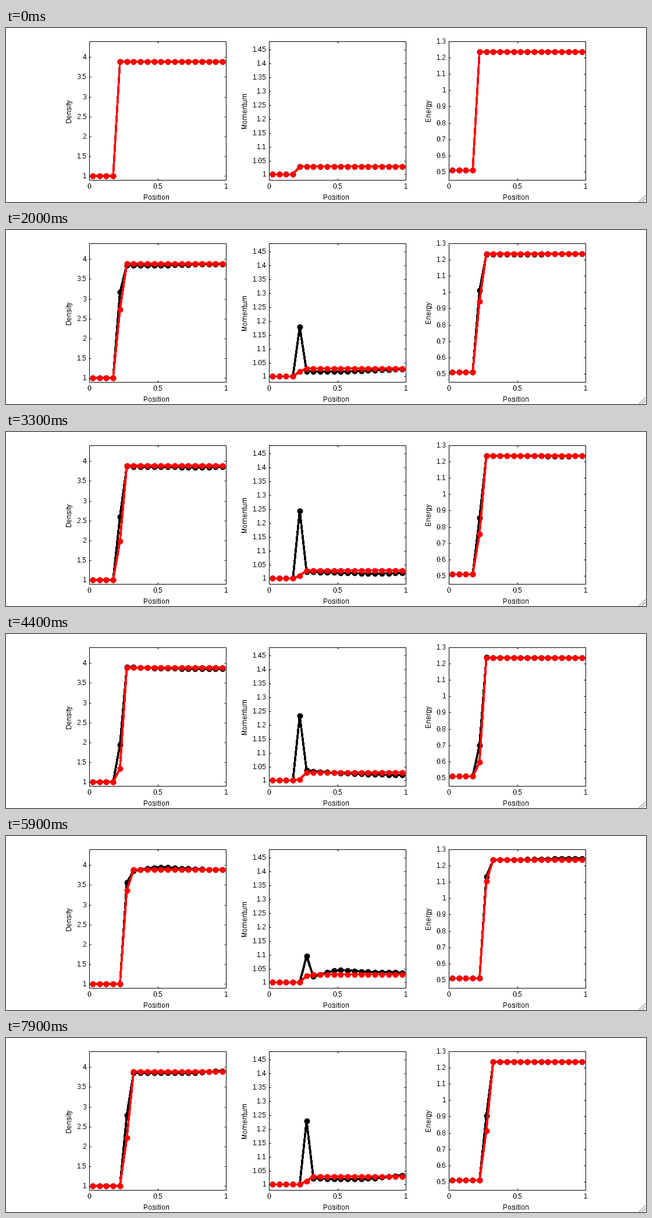
A matplotlib script that plays this animation: 1100 by 300 pixels, repeating every 8 s.

```python
import numpy as np
import matplotlib.pyplot as plt
from matplotlib.animation import FuncAnimation
from matplotlib.lines import Line2D

W, H, DPI = 1100, 300, 100
PX = 72 / DPI
FRAMES, INTERVAL = 80, 100

plt.rcParams.update({
    "font.family": "Liberation Sans",
    "font.size": 12 * PX,
    "text.antialiased": False,
    "text.hinting": "native",
    "text.hinting_factor": 1,
})

# Slowly moving Mach 10 shock in a monatomic gas
GAMMA, MACH, SPEED = 5 / 3, 10.0, 0.01
CELLS, START = 20, 0.2
DX = 1 / CELLS
STEP, SUBSTEPS = 0.1, 4
X = (np.arange(CELLS) + 0.5) * DX


def conserved(rho, u, p):
    return np.array([rho, rho * u, p / (GAMMA - 1) + 0.5 * rho * u * u])


def shock_states():
    w = 1 - SPEED
    p1 = w * w / (GAMMA * MACH ** 2)
    rho2 = (GAMMA + 1) * MACH ** 2 / ((GAMMA - 1) * MACH ** 2 + 2)
    p2 = p1 * (2 * GAMMA * MACH ** 2 - GAMMA + 1) / (GAMMA + 1)
    return conserved(1, 1, p1), conserved(rho2, w / rho2 + SPEED, p2)


LEFT, RIGHT = shock_states()


def exact(n):
    """Cell averages of the travelling discontinuity."""
    edge = START + SPEED * STEP * n
    part = np.clip((edge - X) / DX + 0.5, 0, 1)
    return LEFT[:, None] * part + RIGHT[:, None] * (1 - part)


def primitive(q):
    rho, u = q[0], q[1] / q[0]
    p = (GAMMA - 1) * (q[2] - 0.5 * rho * u * u)
    return rho, u, p, (q[2] + p) / rho


def roe_flux(a, b):
    ra, ua, pa, ha = primitive(a)
    rb, ub, pb, hb = primitive(b)
    sa, sb = np.sqrt(ra), np.sqrt(rb)
    u = (sa * ua + sb * ub) / (sa + sb)
    h = (sa * ha + sb * hb) / (sa + sb)
    c2 = np.maximum((GAMMA - 1) * (h - 0.5 * u * u), 1e-5)
    c, rho = np.sqrt(c2), sa * sb
    du, dp = ub - ua, pb - pa
    one = np.ones_like(u)
    waves = (
        (u - c, (dp - rho * c * du) / (2 * c2), (one, u - c, h - u * c)),
        (u, rb - ra - dp / c2, (one, u, 0.5 * u * u)),
        (u + c, (dp + rho * c * du) / (2 * c2), (one, u + c, h + u * c)),
    )
    fa = np.array([a[1], a[1] * ua + pa, a[1] * ha])
    fb = np.array([b[1], b[1] * ub + pb, b[1] * hb])
    jump = sum(abs(s) * k * np.array(v) for s, k, v in waves)
    return 0.5 * (fa + fb - jump)


def simulate():
    q = exact(0)
    out = [q]
    ratio = STEP / SUBSTEPS / DX
    for _ in range(FRAMES - 1):
        for _ in range(SUBSTEPS):
            full = np.column_stack([LEFT, q, RIGHT])
            q = q - ratio * np.diff(roe_flux(full[:, :-1], full[:, 1:]), axis=1)
        out.append(q)
    return out


numeric = simulate()

fig = plt.figure(figsize=(W / DPI, H / DPI), dpi=DPI, facecolor="white")
# Whole pixels: the renderer snaps thin lines to the centre of the next pixel
TOP, BOTTOM, WIDTH = 23, 262, 235


def label(x, y, s, ha="center", rotation=0):
    fig.text(x / W, 1 - y / H, s, ha=ha, va="baseline",
             rotation=rotation, rotation_mode="anchor")


def panel(left, name, name_x, lo, hi, ticks):
    ax = fig.add_axes([left / W, 1 - BOTTOM / H, WIDTH / W, (BOTTOM - TOP) / H])
    ax.set(xlim=(0, 1), ylim=(lo, hi), xticks=[0, 0.5, 1], yticks=ticks)
    ax.tick_params(direction="in", top=True, right=True, length=3 * PX,
                   width=PX, labelbottom=False, labelleft=False)
    for spine in ax.spines.values():
        spine.set_linewidth(PX)
    for v in (0, 0.5, 1):
        label(left + 0.5 + v * WIDTH, 277, f"{v:g}")
    for v in ticks:
        y = BOTTOM - (v - lo) / (hi - lo) * (BOTTOM - TOP)
        label(left - 4, round(y) + 4, f"{v:g}", ha="right")
    label(left + WIDTH / 2 - 1.5, 296, "Position")
    label(name_x, 142, name, rotation=90)
    return [ax.plot(X, X, "o-", color=color, lw=2.67 * PX, ms=10 * PX, mew=0,
                    antialiased=False, clip_on=False)[0]
            for color in ("black", "red")]


panels = [
    panel(143, "Density", 112, 0.9, 4.4, np.arange(1, 4.1, 0.5)),
    panel(452, "Momentum", 414, 0.98, 1.48, np.arange(20, 30) / 20),
    panel(761, "Energy", 730, 0.45, 1.3, np.arange(5, 14) / 10),
]

# Resize grip in the corner
for size in (11, 6):
    fig.add_artist(Line2D([(W - 1 - size) / W, (W - 1) / W], [0, size / H],
                          color="#808080", lw=PX))


def update(n):
    for k, (black, red) in enumerate(panels):
        black.set_ydata(numeric[n][k])
        red.set_ydata(exact(n)[k])
    return [line for pair in panels for line in pair]


anim = FuncAnimation(fig, update, frames=FRAMES, interval=INTERVAL,
                     repeat=True, repeat_delay=0, blit=False)
plt.show()
```
